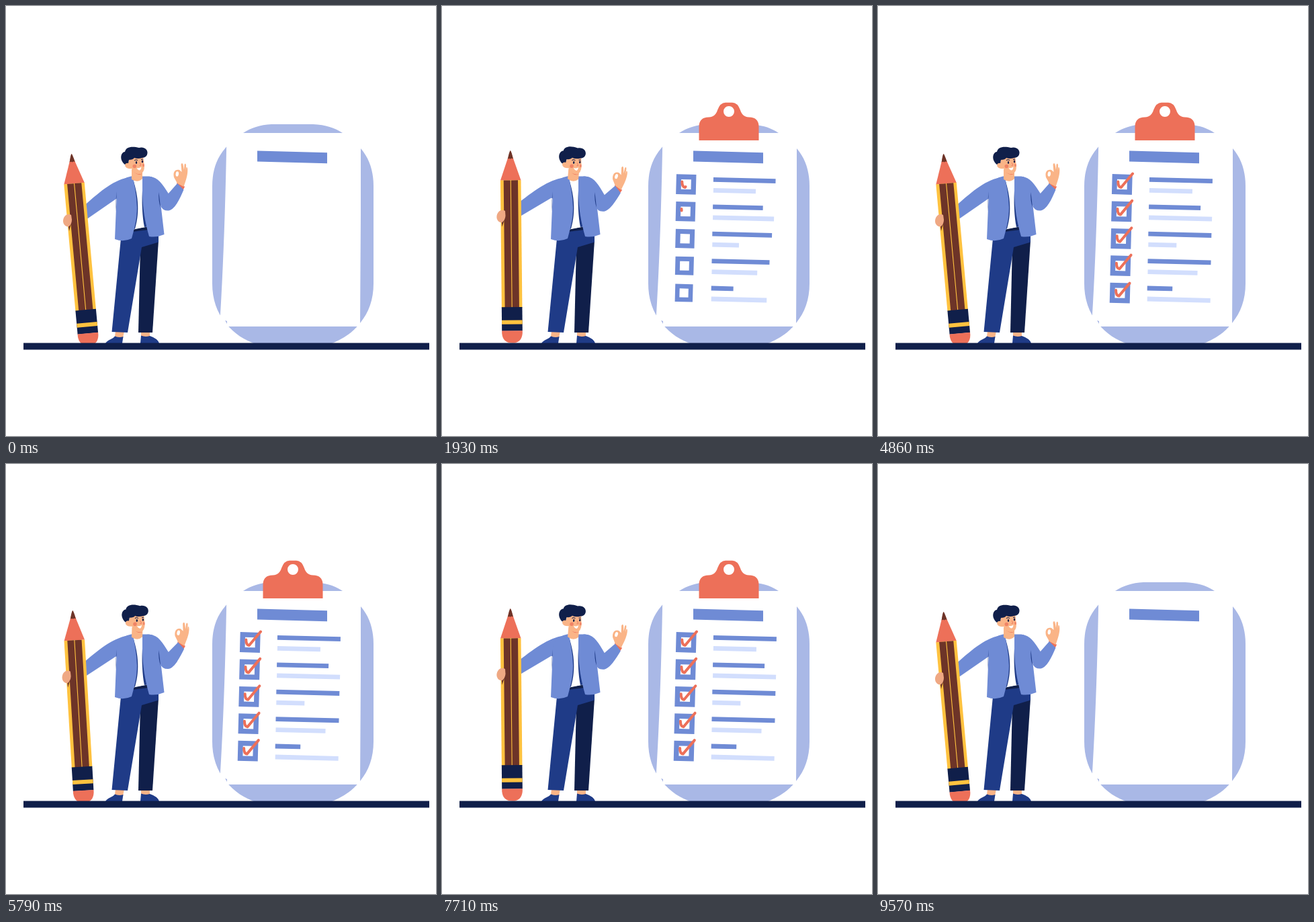
Write an HTML page that moves like this. It is 640 px wide and 640 px high and loops after 9640 ms.

```html
<!DOCTYPE html>
<html lang="en">
<head>
<meta charset="utf-8">
<title>Checklist</title>
<style>
html, body { margin: 0; width: 100%; height: 100%; overflow: hidden; background: #fff; }
svg { display: block; width: 100%; height: 100%; }
.sky { fill: #6f8bd5; }
.blue { fill: #1f3b87; }
.navy { fill: #101f4a; }
.skin { fill: #fab487; }
.red { fill: #ed7059; }
.brown { fill: #6d3428; }
.gold { fill: #ffc23f; }
.white { fill: #fff; }
.pale { fill: #d2defd; }
.tick { fill: none; stroke: #ed7059; stroke-width: 4; stroke-linecap: round; stroke-linejoin: round; }
</style>
</head>
<body>
<svg viewBox="0 0 640 640">
  <!-- board -->
  <path fill="#a9b8e6" d="M395 176H457C476 177 489 181 501 189C512 196 521 203 528 212C541 227 547 246 547 268V413C547 437 540 456 527 472C514 488 500 497 480 504H374C354 497 340 488 327 472C314 456 307 437 307 413V268C307 246 313 227 326 212C333 203 342 196 353 189C365 181 378 177 395 176Z"/>
  <path class="white" d="M328.500 189H528V310L527 477H329L318 466L319 459Q326 340 328.500 189Z"/>
  <path fill="#a9b8e6" d="M326 468L329 469V473Z"/>
  <path class="sky" d="M374 215.500L478 218.300V234.300L374 231.500Z"/>
  <g id="list">
    <g id="clip">
      <path class="red" fill-rule="evenodd" d="M382.500 200V180Q382.500 165.500 397 165.500C405 165 408 161 410 155Q414 143.700 422 143.700H432Q440 143.700 444 155C446 161 449 165 457 165.500Q471.500 165.500 471.500 180V200ZM427 149A8 8 0 1 0 427 165A8 8 0 1 0 427 149Z"/>
    </g>
  </g>

  <!-- arm behind the pencil -->
  <g class="grip">
    <path class="sky" d="M190 254C165 256 146 271 121 293L108 304L110 324L122 316L164 287L182 290Z"/>
  </g>
  <g id="pencil">
    <path class="red" d="M0 0L15.300 44.500H-15.300Z"/>
    <path class="brown" d="M0 0Q1.500 1 4 12.500Q2 11 0 12.500Q-2 11 -4 12.500Q-1.500 1 0 0Z"/>
    <path class="gold" d="M-15.300 44.300H15.300V234H-15.300Z"/>
    <path class="brown" d="M-10.500 44.300H-.5V234H-10.500ZM.6 44.300H10.800V234H.6Z"/>
    <path class="navy" d="M-15.300 233H15.300V268.500H-15.300Z"/>
    <path class="gold" d="M-15.300 252.500H15.300V258.500H-15.300Z"/>
    <path class="red" d="M-15.300 268.300H15.300V272Q14 286.500 0 286.500Q-14 286.500 -15.300 272Z"/>
  </g>
  <g class="grip">
    <path class="brown" d="M92.500 325L98 320L94 335Z"/>
    <path fill="#efa883" d="M97 311C91 307.500 85 313 85 320C85 326 90 329.500 94 328Q98 324 98 318Z"/>
  </g>

  <!-- legs -->
  <path class="skin" d="M163 484H176L174 494L162 492ZM201 484H214V493H201Z"/>
  <path class="blue" d="M148 502C152 496 159 496 162 491.500Q168 494 174.500 492L173 502ZM200 502L201 490.500Q207 493 214 491Q226 495 228 502Z"/>
  <path class="navy" d="M200 355L227 349L218 486H197Z"/>
  <path class="blue" d="M171 346L190 333L212 330L227 342V351.500L202 359L181 486L157.500 485Z"/>
  <path class="navy" d="M188 333L212 328V333L188 336Z"/>

  <!-- torso -->
  <path class="white" d="M187 255H204L208 329L189 332Z"/>
  <path class="blue" d="M188 255C196 278 200 305 192 331.500L186 333ZM203.500 268C201.500 290 203 315 206 329L213 328Z"/>
  <g id="arm">
    <path class="sky" d="M210 254C225 253 231 262 243 281L246 300Q238 308 231 299L225 278Z"/>
    <g id="forearm">
      <path class="red" d="M254 264L257 260L266 269L263 275Z"/>
      <path class="skin" d="M255 264L250 255C248 247 252 242.500 258 244L261.500 247L260.500 236Q262 232 263.500 236L265 244L265.500 236Q267.500 232.500 268 237L267.800 245L268.500 240Q270.500 239 270.300 246C270 254 267 261 264.500 269Z"/>
      <ellipse class="white" cx="254.800" cy="250" rx="2.200" ry="3.800" transform="rotate(8 255 250)"/>
      <path class="sky" d="M240 281L255 264L264.500 273.500C259 286 252 303 242 304.500Q233 305 231 298Z"/>
    </g>
  </g>
  <path class="sky" d="M189 253C175 255 166 262 165 275L162 347Q175 352 187 346C192 328 195 316 195 300C194.500 280 191 268 189 253ZM203 253.500H213Q227 255 228 275L235.500 340Q224 345 213 343C207 322 203 300 203 276Z"/>
  <path class="blue" d="M165 276Q162.500 292 164 306Q163.200 292 165 276ZM227.500 277L230 300Q226.500 290 227.500 277Z"/>

  <g id="head">
    <path class="skin" d="M187 243H203V257Q196 264 187 258Z"/>
    <path class="red" d="M189 246Q195 252 203 249.500Q197 253.500 189 246Z"/>
    <path class="skin" d="M183 224L204 223L206 238Q206 248 200 250Q192 250 187 242Q178 243 177 237Q178 231 183 232Z"/>
    <path class="navy" d="M177 236C172 232 170 226 172 221Q174 217 177 217C178 210 187 208 198 211C205 209 211 213 210.500 219Q210 225 203 226Q196 228 191 226Q189 229 183 229L182 234Q179 233 177 236Z"/>
    <g fill="#ed7059" opacity=".7"><circle cx="191.300" cy="238.500" r="2.800"/><ellipse cx="204.500" cy="237" rx="1.400" ry="2.300"/></g>
    <ellipse class="navy" cx="194" cy="233" rx="1.200" ry="1.900"/>
    <ellipse class="navy" cx="203" cy="231.500" rx="1.200" ry="1.900"/>
    <path fill="none" stroke="#101f4a" d="M191 230Q193 228 196 229.500M201 228.500L204 228"/>
    <path fill="none" stroke="#ed7059" stroke-width=".8" d="M199 233L201 237L198.500 237.500"/>
    <path class="white" d="M194.500 241Q198 242 201.500 239.500Q201 245 198 244.500Q195.500 244 194.500 241Z"/>
  </g>
  <path class="navy" d="M26 501.500H630V511.500H26Z"/>
</svg>
<script>
const LOOP = 9640, SWAY = LOOP / 2;
const DARK = [94, 77, 94, 94, 37.5], PALE = [64, 94, 42, 74, 94];
const $ = id => document.getElementById(id);
const list = $('list');
const unit = (t, start, length) => Math.min(1, Math.max(0, (t - start) / length));
const easeOut = (u, power) => 1 - (1 - u) ** power;
const set = (el, name, value) => el.setAttribute(name, value);

function add(parent, tag, attrs) {
  const el = document.createElementNS('http://www.w3.org/2000/svg', tag);
  for (const name in attrs) set(el, name, attrs[name]);
  return parent.appendChild(el);
}

const rows = DARK.map((dark, i) => {
  const row = add(list, 'g', { transform: `translate(${363.3 - 0.8 * i} ${265.5 + 40.4 * i})` });
  const box = add(row, 'path', { class: 'sky', 'fill-rule': 'evenodd',
    d: 'M-15-15H15V15H-15ZM-7.500-7.500V7.500H7.500V-7.500Z' });
  const bar = (y, cls) => add(row, 'rect', { class: cls, x: 40.7, y, height: 6.8,
    transform: `rotate(1.4 40.7 ${y})` });
  const bars = [[bar(-10.5, 'sky'), dark], [bar(5.5, 'pale'), PALE[i]]];
  const tick = add(row, 'path', { class: 'tick', pathLength: 1,
    d: 'M-6-4Q-6 4-1.500 4.500L15.700-16' });
  return { box, bars, tick };
});

function draw(t) {
  const sway = (1 - Math.cos(2 * Math.PI * t / SWAY)) / 2;
  const turn = (el, angle, x, y) => set(el, 'transform', `rotate(${angle * sway} ${x} ${y})`);
  document.querySelectorAll('.grip').forEach(el => turn(el, 4.4, 180, 265));
  turn($('head'), 5.5, 195, 258);
  turn($('arm'), 2.5, 220, 262);
  turn($('forearm'), 6.3, 236, 295);
  set($('pencil'), 'transform',
    `translate(${97.5 + 4.7 * sway} ${220 - 5.4 * sway}) rotate(${5.1 * sway - 5.2})`);

  set(list, 'opacity', 1 - unit(t, 8440, 760));
  const pop = easeOut(unit(t, 70, 1000), 2);
  set($('clip'), 'transform', `translate(427 172) scale(${pop}) translate(-427 -172)`);
  rows.forEach(({ box, bars, tick }, i) => {
    const grow = easeOut(unit(t, 700 + 80 * i, 1400), 2);
    set(box, 'transform', `rotate(1.5) scale(${grow})`);
    for (const [bar, width] of bars) set(bar, 'width', width * grow);
    const drawn = easeOut(unit(t, 1430 + 410 * i, 2000), 1.3);
    set(tick, 'stroke-dasharray', `${drawn} 2`);
    set(tick, 'visibility', drawn > 0 ? 'visible' : 'hidden');
  });
}

const begin = performance.now();
function frame() {
  draw((performance.now() - begin) % LOOP);
  requestAnimationFrame(frame);
}
frame();
</script>
</body>
</html>
```
